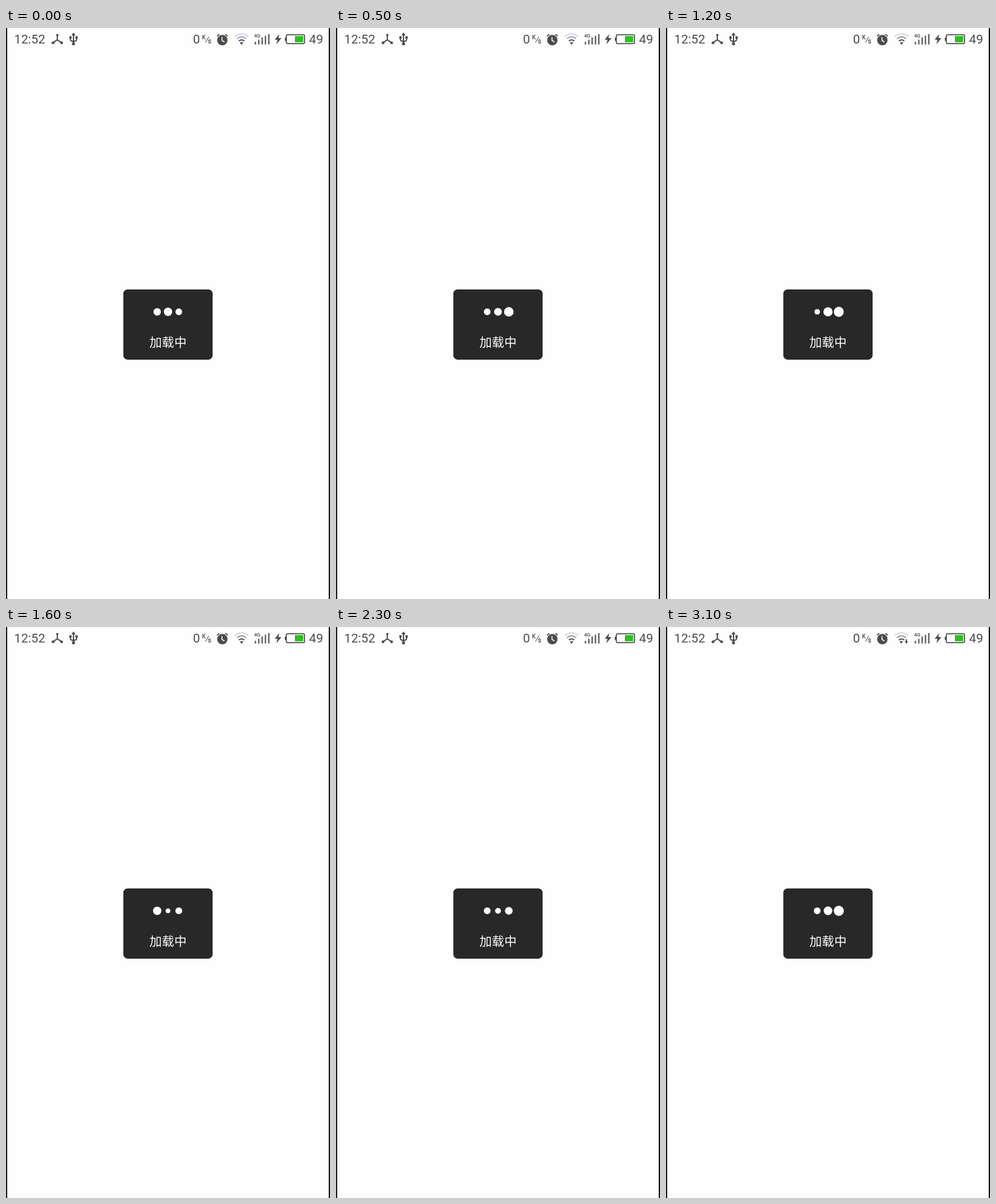
Animation of 480x847 px, one loop 3200 ms. Source, as an HTML page:

```html
<!DOCTYPE html>
<html lang="zh-CN">
<head>
<meta charset="utf-8">
<title>加载中</title>
<style>
  html, body { margin: 0; width: 100%; height: 100%; overflow: hidden; background: #fefefe; }
  svg { display: block; width: 480px; height: 847px; }
  .status { fill: #4b4b4d; font-family: Roboto, sans-serif; font-size: 18.5px; }
  .line { fill: none; stroke: #464648; }
  .label { fill: #fff; font: 350 18.4px "Noto Sans CJK SC", "Noto Sans CJK", sans-serif; }
</style>
</head>
<body>
<svg viewBox="0 0 480 847">
  <rect width="480" height="847" fill="#fefefe"/>
  <path d="M0 0h1.7v847H0zM478.2 0h1.8v847h-1.8z" fill="#08080c"/>

  <g class="status">
    <text x="12" y="23">12:52</text>
    <text x="277" y="23">0</text>
    <text x="290.5" y="16.5" font-size="8.5" font-weight="500">K</text>
    <text x="299" y="23" font-size="10" font-weight="500">s</text>
    <path class="line" d="M295.5 21.5l5-8.5"/>
    <text x="449" y="23">49</text>

    <g id="hub">
      <path class="line" stroke-width="1.7" d="M76 10v7.5l-6.5 4.5M76 17.5l6.5 4.5"/>
      <circle cx="76" cy="10.5" r="1.7"/>
      <circle cx="69.6" cy="22" r="2.1"/>
      <circle cx="82.4" cy="22" r="2.1"/>
    </g>

    <g id="usb">
      <path class="line" stroke-width="1.8" d="M100 10v13M95.5 14v3.5q0 2 4.5 2.5M104.5 14v3.5q0 2-4.5 2.5"/>
      <path d="M100 6.5l3 4.5h-6zM102.8 12.3h3.5v3.5h-3.5z"/>
      <circle cx="95.5" cy="14" r="2"/>
      <circle cx="100" cy="23.5" r="2.3"/>
    </g>

    <g id="alarm">
      <circle cx="320.5" cy="18" r="7.7"/>
      <path class="line" stroke-width="1.6" d="M312.6 12.2l3.4-2.9M328.4 12.2l-3.4-2.9"/>
      <path d="M320 13.5v4.8l3.6 2.6" fill="none" stroke="#fefefe" stroke-width="1.4"/>
    </g>

    <g id="wifi" fill="none">
      <path id="outerArc" d="M339.3 12.6Q349 4.4 358.7 12.6" stroke-width="1.7" stroke-dasharray="1.5 .7"/>
      <path id="middleArc" d="M342.2 16Q349 10 355.8 16" stroke-width="1.6"/>
      <path class="line" d="M345 19.3Q349 15.9 353 19.3" stroke-width="1.8"/>
      <path id="signalTip" d="M346.3 21.3h5.4l-2.7 3.6z" fill="#464648"/>
      <path id="traffic" d="M346 21h5l-2.5 3.8zM353.7 21.2h1.6v-3h1.7v3h1.6l-2.45 3.6z" fill="#464648"/>
    </g>

    <text x="367.5" y="14" font-size="7.5" font-weight="500">4G</text>
    <path class="line" stroke-width="1.8" d="M369.5 24.5v-4M374.5 24.5v-7M379.5 24.5v-10.5M384.4 24.5v-13M389.4 24.5V9"/>
    <path d="M404.8 9l-6.8 8.5h4.2l-1.7 6.7 7.5-9.2h-4.4z"/>

    <rect class="line" x="415.3" y="10" width="27" height="13.2" rx="2" stroke-width="1.5"/>
    <path d="M413 14.5h2v4.5h-2z"/>
    <path d="M428 12h12.3v9.2H428z" fill="#2bc11f"/>
  </g>

  <rect x="173.8" y="387.7" width="132.3" height="104.3" rx="6.5" fill="#282828"/>
  <g id="dots" fill="#fff"></g>
  <text class="label" x="212.4" y="473.4">加载中</text>
</svg>
<script>
const LOOP = 3200, STEP = 100, PULSE = 648;

// Each row: position in the pulse, then the radii of the three dots.
const pulse = [
  [0, 5.5, 6.2, 4.9],
  [.16, 6.5, 5.5, 3.8],
  [.321, 6.2, 4.5, 4.1],
  [.469, 6.2, 3.5, 5.1],
  [.549, 5, 4.3, 5.7],
  [.772, 5, 5.8, 7.1],
  [.784, 5, 6.4, 7.5],
  [.852, 4, 6.8, 7.4],
  [1, 5.5, 6.2, 4.9]
];

const $ = id => document.getElementById(id);
const dots = [224, 240, 256].map(cx => {
  const dot = document.createElementNS($('dots').namespaceURI, 'circle');
  dot.setAttribute('cx', cx);
  dot.setAttribute('cy', 421);
  return $('dots').appendChild(dot);
});

function radius(phase, dot) {
  const end = pulse.findIndex(row => row[0] > phase);
  const a = pulse[end - 1], b = pulse[end];
  const mix = (phase - a[0]) / (b[0] - a[0]);
  return a[dot + 1] + (b[dot + 1] - a[dot + 1]) * mix;
}

function draw(now) {
  const time = Math.floor(now % LOOP / STEP) * STEP;
  const phase = time / PULSE % 1;
  dots.forEach((dot, i) => dot.setAttribute('r', radius(phase, i).toFixed(2)));

  const busy = time >= 2500, tinted = time < 700;
  $('traffic').style.display = busy ? '' : 'none';
  $('signalTip').style.display = busy ? 'none' : '';
  $('outerArc').style.stroke = tinted ? '#b9b9f3' : '#c0c0c4';
  $('middleArc').style.stroke = tinted ? '#8f8fc0' : '#88888c';
}

function tick() {
  draw(performance.now());
  requestAnimationFrame(tick);
}
tick();
</script>
</body>
</html>
```
